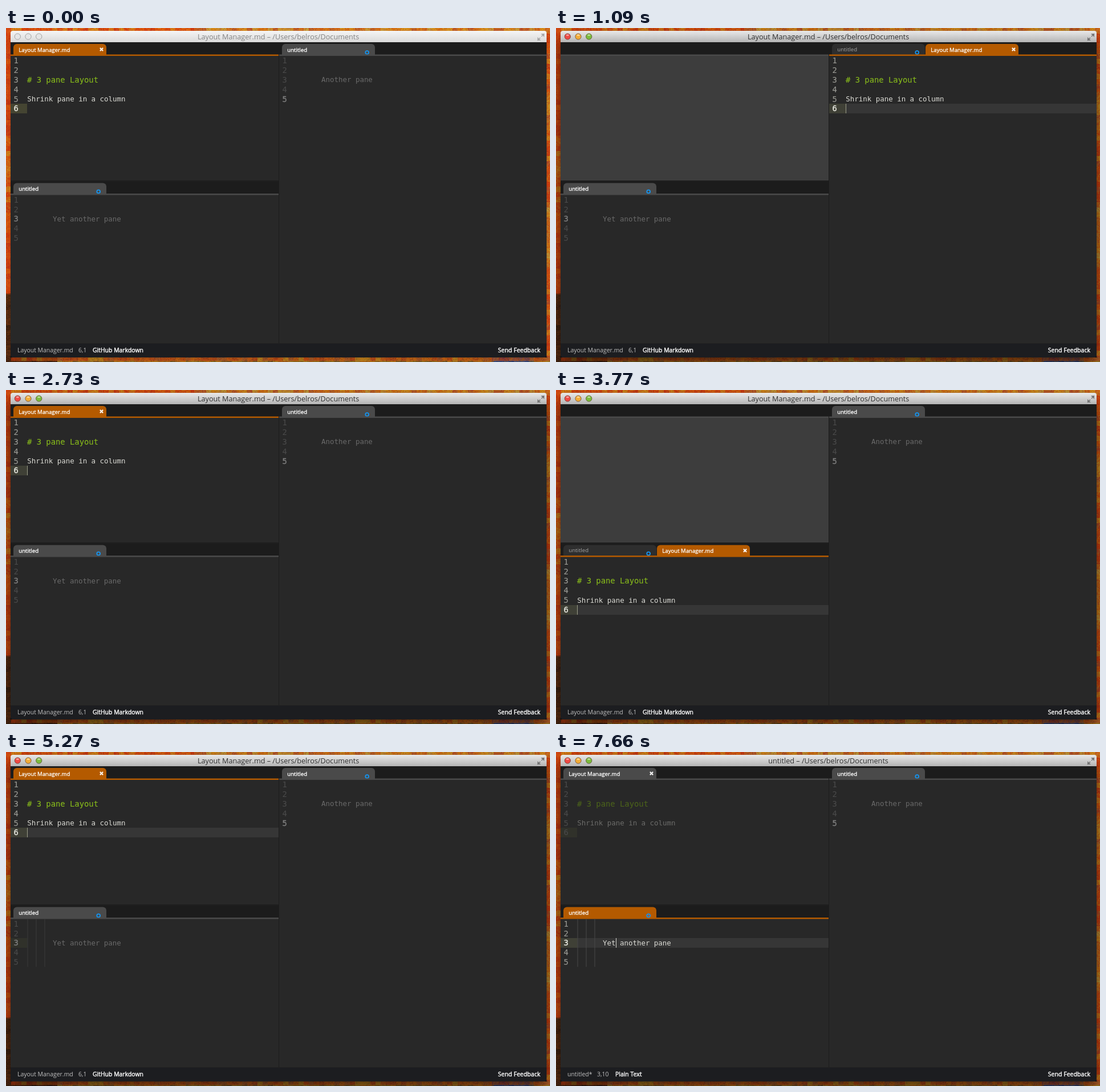
Animation of 954 by 587 pixels, one loop 8 s. Source, as an HTML page with a canvas:

```html
<!DOCTYPE html>
<html lang="en">
<head>
<meta charset="utf-8">
<title>Pane layout</title>
<style>
  html, body { margin: 0; width: 100%; height: 100%; overflow: hidden; background: #b4500c; }
  canvas { display: block; }
</style>
</head>
<body>
<canvas id="stage" width="954" height="587"></canvas>
<script>
const W = 954, H = 587, LOOP = 8000;
const stage = document.getElementById('stage');
const c = stage.getContext('2d');

const SANS = '"Open Sans", "Noto Sans", sans-serif';
const MONO = '"DejaVu Sans Mono", "Noto Sans Mono", monospace';
const PATH = ' – /Users/belros/Documents';
const DOC = 'Layout Manager.md';
const ORANGE = '#b45a00', GREY = '#4a4a4a', EDITOR = '#282828', BAR = '#1c1c1c';
const ROW = 16.8;

const PANES = {
  top: { x: 8, y: 25, w: 470, h: 243 },
  bottom: { x: 8, y: 269.5, w: 470, h: 285.5 },
  right: { x: 479, y: 25, w: 469, h: 530 }
};
const NOTES = {
  bottom: { text: 'Yet another pane', x: 74, current: 3 },
  right: { text: 'Another pane', x: 74, current: 5 }
};

// Each step changes part of the state from its time on.
const STEPS = [
  [0, { front: false, place: 'top', title: DOC, line: false, caret: false, focus: 'doc', guides: false }],
  [500, { front: true, line: true, caret: true }],
  [800, { caret: false }],
  [1090, { place: 'right', caret: true }],
  [1690, { caret: false }],
  [1980, { caret: true }],
  [2430, { caret: false }],
  [2580, { title: 'untitled', caret: true }],
  [2730, { title: DOC, place: 'top', line: false }],
  [2880, { line: true }],
  [3180, { caret: false }],
  [3630, { caret: true }],
  [3770, { place: 'bottom' }],
  [4070, { caret: false }],
  [4370, { caret: true }],
  [4820, { caret: false }],
  [5270, { place: 'top', caret: true, guides: true }],
  [5570, { caret: false }],
  [6010, { caret: true }],
  [6460, { caret: false }],
  [6760, { caret: true }],
  [7210, { caret: false }],
  [7360, { focus: 'bottom', title: 'untitled', line: false }],
  [7510, { line: true }],
  [7660, { caret: true }]
];

function stateAt(t) {
  const s = {};
  for (const [at, patch] of STEPS) if (t >= at) Object.assign(s, patch);
  return s;
}

function rect(x, y, w, h, fill) {
  c.fillStyle = fill;
  c.fillRect(x, y, w, h);
}

function text(str, x, y, size, fill, { family = SANS, align = 'left', heavy = 0 } = {}) {
  c.font = `${size}px ${family}`;
  c.textAlign = align;
  c.fillStyle = fill;
  c.fillText(str, x, y);
  if (heavy) {
    c.strokeStyle = fill;
    c.lineWidth = heavy;
    c.strokeText(str, x, y);
  }
}

function mono(str, x, y, size, fill, heavy = 0) {
  text(str, x, y, size, fill, { family: MONO, heavy });
}

function line(x1, y1, x2, y2, color, width) {
  c.strokeStyle = color;
  c.lineWidth = width;
  c.beginPath();
  c.moveTo(x1, y1);
  c.lineTo(x2, y2);
  c.stroke();
}

function seeded(seed) {
  return () => {
    seed = (seed * 1664525 + 1013904223) % 4294967296;
    return seed / 4294967296;
  };
}

// Speckled colour field that shows around the window.
function makeBackdrop() {
  const layer = document.createElement('canvas');
  layer.width = W;
  layer.height = H;
  const g = layer.getContext('2d');
  const rnd = seeded(41);
  const red = ['#d8400f', '#dc5212', '#e0600f', '#cc3a14'];
  const gold = ['#d87414', '#d8901c', '#c8a03c', '#d0641a', '#b8502a'];
  const dark = ['#4a2410', '#5c2e10', '#38200f', '#6a3412'];
  const olive = ['#94701e', '#a8802a', '#b0601a', '#c07418', '#705024'];
  const blue = ['#3a4c80', '#505880', '#2e3c70', '#80682c'];
  const pick = (x, y) => {
    if (y > 577) return x < 90 ? dark : x > 850 && x < 925 ? blue : olive;
    if (x < 9) return y > 465 ? dark : y > 190 && y < 330 ? gold.slice(0, 2).concat(red) : red;
    if (y < 9) return x < 330 ? red.concat(gold[1]) : gold;
    return y > 110 && y < 170 || y > 300 && y < 420 ? gold : red.concat(gold[1], gold[4]);
  };
  const speckle = (size, alpha) => {
    g.globalAlpha = alpha;
    for (let y = 0; y < H; y += size) {
      for (let x = 0; x < W; x += size) {
        if (x > 9 && x < 945 && y > 9 && y < 576) continue;
        const set = pick(x, y);
        g.fillStyle = set[Math.floor(rnd() * set.length)];
        g.fillRect(x, y, size, size);
      }
    }
  };
  speckle(9, 1);
  speckle(2, 0.4);
  return layer;
}
const backdrop = makeBackdrop();

function drawTitleBar(s) {
  const g = c.createLinearGradient(0, 5, 0, 25);
  g.addColorStop(0, s.front ? '#e9e9e9' : '#f5f5f5');
  g.addColorStop(1, s.front ? '#b4b4b4' : '#dadada');
  c.fillStyle = g;
  c.beginPath();
  c.roundRect(8, 5, 940, 21, [4, 4, 0, 0]);
  c.fill();

  ['#ee4a44', '#f2ac38', '#7cbc3c'].forEach((color, i) => {
    const x = 20.3 + i * 18.7;
    c.beginPath();
    c.arc(x, 15, 5.2, 0, Math.PI * 2);
    c.fillStyle = s.front ? color : '#e6e6e6';
    c.fill();
    c.strokeStyle = s.front ? 'rgba(60,30,20,.55)' : '#a4a4a4';
    c.lineWidth = 1;
    c.stroke();
    if (s.front) {
      c.beginPath();
      c.ellipse(x, 12.6, 2.6, 1.3, 0, 0, Math.PI * 2);
      c.fillStyle = 'rgba(255,255,255,.5)';
      c.fill();
    }
  });
  text(s.title + PATH, 477.6, 19.6, 12.66, s.front ? '#303030' : '#858585', { align: 'center' });

  const ink = s.front ? '#777' : '#aaa';
  c.fillStyle = ink;
  for (const [x, y, d] of [[944, 10, -1], [932, 22, 1]]) {
    c.beginPath();
    c.moveTo(x, y);
    c.lineTo(x + 6 * d, y);
    c.lineTo(x, y - 6 * d);
    c.closePath();
    c.fill();
    line(x, y, x + 5 * d, y - 5 * d, ink, 1.6);
  }
}

function drawTab(x, y, label, fill, ink, { heavy = 0, dirty = false, lift = 0 } = {}) {
  c.fillStyle = fill;
  c.beginPath();
  c.roundRect(x, y, 163, 20, [6, 6, 0, 0]);
  c.fill();
  text(label, x + 9.3, y + 13.8 - lift, 9.62, ink, { heavy });
  if (dirty) {
    c.strokeStyle = '#1493ee';
    c.lineWidth = 1.8;
    c.beginPath();
    c.arc(x + 149.2, y + 15, 2.9, 0, Math.PI * 2);
    c.stroke();
  } else {
    const cx = x + 154.5, cy = y + 9.6;
    line(cx - 2.6, cy - 2.6, cx + 2.6, cy + 2.6, '#fff', 2);
    line(cx + 2.6, cy - 2.6, cx - 2.6, cy + 2.6, '#fff', 2);
  }
}

function drawTabs(name, holdsDoc, active) {
  const p = PANES[name], x = p.x + 5, y = p.y + 3;
  const accent = active ? ORANGE : GREY;
  rect(p.x, p.y, p.w, 22, BAR);
  if (name !== 'top') {
    drawTab(x, y, 'untitled', holdsDoc ? '#2e2e2e' : accent, holdsDoc ? '#a6a6a6' : '#fff',
      { dirty: true, heavy: holdsDoc ? 0 : 0.35, lift: holdsDoc ? 1 : 0 });
  }
  if (holdsDoc) {
    drawTab(name === 'top' ? x : x + 164, y, DOC, accent, '#fff', { heavy: 0.3 });
  }
  rect(p.x, p.y + 21.5, p.w, 2.5, accent);
}

function rowTop(p, n) {
  return p.y + 24.3 + ROW * (n - 1);
}

function drawGutter(p, count, current, active) {
  for (let n = 1; n <= count; n++) {
    const here = n === current;
    const ink = active ? (here ? '#f0f0e8' : '#9c9c96') : here ? '#808080' : '#4a4a4a';
    mono(String(n), p.x + 5.6, rowTop(p, n) + 13, 13.85, ink, here ? 0.3 : 0.1);
  }
}

function drawCurrentRow(p, n, { full, gutter }) {
  const y = Math.round(rowTop(p, n));
  if (full) rect(p.x, y, p.w, 17, '#363636');
  if (gutter) rect(p.x, y, 29, 17, gutter);
}

function drawCaret(p, n, dx, color) {
  rect(p.x + dx, Math.round(rowTop(p, n)), 1, 17, color);
}

function drawDoc(p, s, active) {
  const gutter = !active ? '#30312a' : !s.front ? '#454532' : '#3f4036';
  drawCurrentRow(p, 6, { full: active && s.line, gutter });
  drawGutter(p, 6, active ? 6 : 0, active);
  mono('# 3 pane Layout', p.x + 29, rowTop(p, 3) + 12.7, 13.85, active ? '#86b81c' : '#4b611c', 0.1);
  mono('Shrink pane in a column', p.x + 29.3, rowTop(p, 5) + 12.5, 12.45, active ? '#dcdcd6' : '#6c6c6a');
  if (active && s.caret) drawCaret(p, 6, 29, '#9a9c88');
}

function drawNote(name, s, active) {
  const p = PANES[name], note = NOTES[name];
  if (name === 'bottom' && s.guides) {
    drawCurrentRow(p, 3, { full: active && s.line, gutter: active ? '#3f4036' : '#30312a' });
    for (let i = 0; i < 3; i++) {
      rect(p.x + 29.5 + i * 15, p.y + 24, 1, ROW * 5, active ? '#484848' : '#3a3a3a');
    }
  }
  drawGutter(p, 5, note.current, active);
  mono(note.text, p.x + note.x, rowTop(p, 3) + 12.5, 12.45, active ? '#dcdcd6' : '#6a6a6a');
  if (active && s.caret) drawCaret(p, 3, 97, '#d4d4cc');
}

function drawPane(name, s) {
  const p = PANES[name];
  const holdsDoc = s.place === name;
  const active = s.focus === 'doc' ? holdsDoc : s.focus === name;
  const empty = name === 'top' && !holdsDoc;
  rect(p.x, p.y, p.w, p.h, empty ? '#3d3d3d' : EDITOR);
  drawTabs(name, holdsDoc, active);
  if (holdsDoc) drawDoc(p, s, active);
  else if (!empty) drawNote(name, s, active);
}

function drawStatus(s) {
  rect(8, 555, 940, 24, '#1c1d20');
  rect(8, 554, 940, 1, '#202020');
  const items = s.focus === 'doc'
    ? [[DOC, 20], ['6,1', 127], ['GitHub Markdown', 152]]
    : [['untitled*', 20], ['3,10', 72], ['Plain Text', 104]];
  items.forEach(([label, x], i) => {
    text(label, x, 570.4, 10.45, i === 2 ? '#fff' : '#c0c0c0', { heavy: i === 2 ? 0.4 : 0 });
  });
  text('Send Feedback', 937, 570.4, 10.6, '#fff', { align: 'right', heavy: 0.4 });
}

// The window throws a deeper shadow while it is in front.
function drawBackdrop(s) {
  c.drawImage(backdrop, 0, 0);
  c.save();
  c.shadowColor = s.front ? 'rgba(0,0,0,.75)' : 'rgba(0,0,0,.25)';
  c.shadowBlur = s.front ? 28 : 12;
  c.shadowOffsetY = s.front ? 8 : 4;
  rect(8, 9, 940, 570, '#000');
  c.restore();
}

function draw(t) {
  const s = stateAt(t);
  drawBackdrop(s);
  drawTitleBar(s);
  c.save();
  c.beginPath();
  c.roundRect(8, 25, 940, 554, [0, 0, 4, 4]);
  c.clip();
  rect(8, 25, 940, 554, BAR);
  for (const name of Object.keys(PANES)) drawPane(name, s);
  drawStatus(s);
  c.restore();
}

const start = performance.now();
function tick() {
  draw((performance.now() - start) % LOOP);
  requestAnimationFrame(tick);
}
tick();
</script>
</body>
</html>
```
